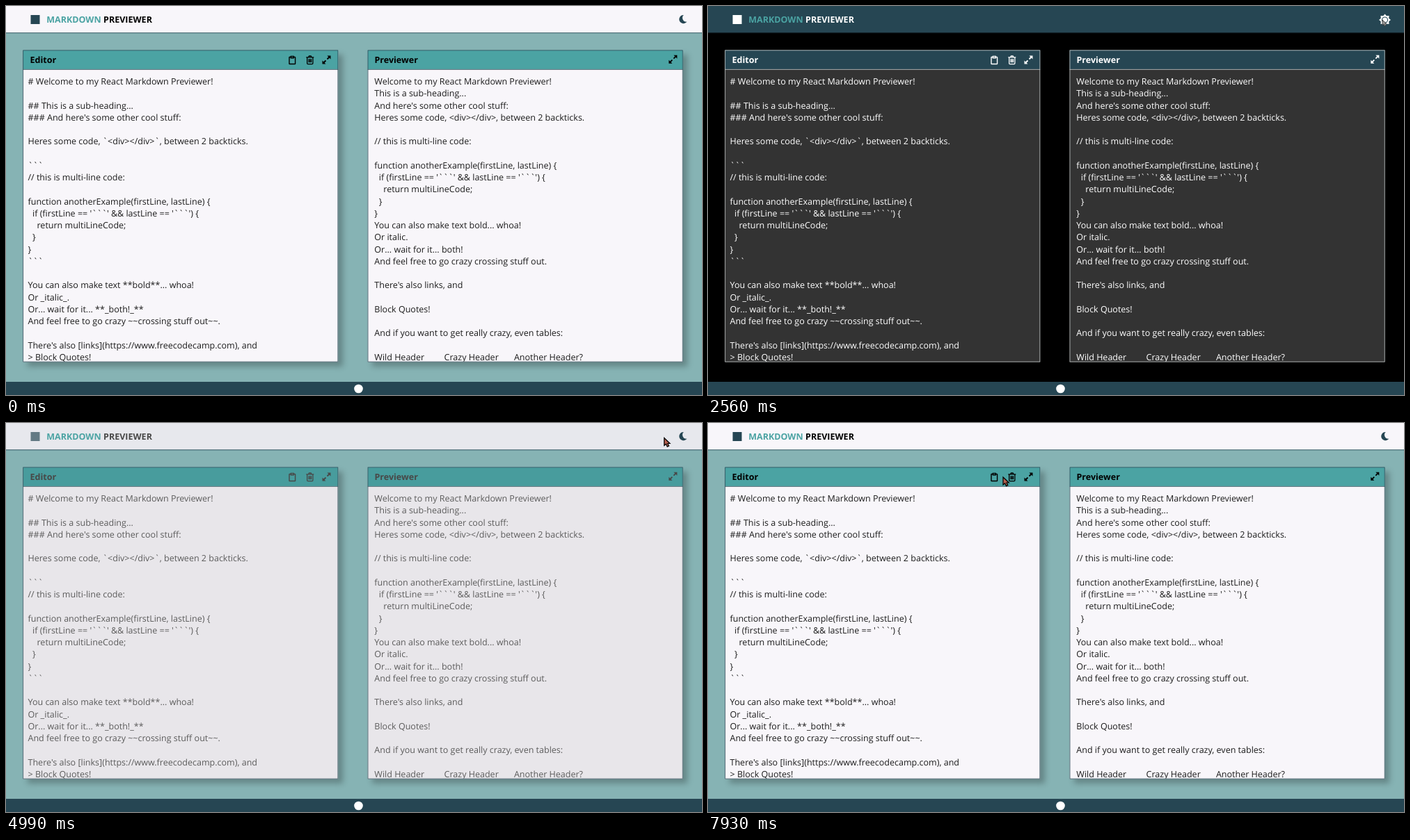
Recreate the animation shown at these times as an HTML page with a canvas. Size 1000 by 560 pixels, loop 8000 ms.

```html
<!DOCTYPE html>
<html lang="en">
<head>
<meta charset="utf-8">
<title>Markdown Previewer</title>
<style>
  html, body { margin: 0; width: 100%; height: 100%; overflow: hidden; }
  canvas { display: block; }
</style>
</head>
<body>
<canvas id="stage" width="1000" height="560"></canvas>
<script>
const ctx = document.getElementById('stage').getContext('2d');
const LOOP = 8000;
const PX = 1000 / 1276; // one page pixel; the page is 1276 wide
const LINE = 22 * PX;
const FONT = `${16 * PX}px "Open Sans", sans-serif`;
ctx.textRendering = 'geometricPrecision';

const editorText = `# Welcome to my React Markdown Previewer!

## This is a sub-heading...
### And here's some other cool stuff:

Heres some code, \`<div></div>\`, between 2 backticks.

\`\`\`
// this is multi-line code:

function anotherExample(firstLine, lastLine) {
  if (firstLine == '\`\`\`' && lastLine == '\`\`\`') {
    return multiLineCode;
  }
}
\`\`\`

You can also make text **bold**... whoa!
Or _italic_.
Or... wait for it... **_both!_**
And feel free to go crazy ~~crossing stuff out~~.

There's also [links](https://www.freecodecamp.com), and
> Block Quotes!`.split('\n');

const previewText = `Welcome to my React Markdown Previewer!
This is a sub-heading...
And here's some other cool stuff:
Heres some code, <div></div>, between 2 backticks.

// this is multi-line code:

function anotherExample(firstLine, lastLine) {
  if (firstLine == '\`\`\`' && lastLine == '\`\`\`') {
    return multiLineCode;
  }
}
You can also make text bold... whoa!
Or italic.
Or... wait for it... both!
And feel free to go crazy crossing stuff out.

There's also links, and

Block Quotes!

And if you want to get really crazy, even tables:
`.split('\n');

const LIGHT_AGAIN = 4810;

// [time, darkness]
const themeSteps = [[0, 0], [2330, 0.07], [2410, 0.6], [2490, 0.9], [2560, 1],
  [LIGHT_AGAIN, 0.88], [4890, 0.35], [4970, 0.08], [5040, 0]];

// [start, end, steps, fromX, fromY, toX, toY]
const moves = [
  [430, 515, 2, 976, 809, 985, 271],
  [750, 1380, 9, 994, 44, 969, 20],
  [4960, 5500, 8, 969, 20, 426, 55],
  [5670, 6050, 6, 426, 55, 405, 73],
  [6670, 6760, 2, 405, 73, 405, 75],
  [7780, 7930, 3, 405, 75, 424, 78]
];

const shapes = {
  clipboard: new Path2D('M3 2H1.2Q.7 2 .7 2.6V11.4Q.7 12 1.2 12H8.8Q9.3 12 9.3 11.4V2.6Q9.3 2 8.8 2H7M3 1H7V3.2H3Z'),
  trash: new Path2D('M0 2.5H11M3.3 2.3L4.2.7H6.8L7.7 2.3M1.4 2.7V11.3Q1.4 12.3 2.4 12.3H8.6Q9.6 12.3 9.6 11.3V2.7M3.8 5V10M5.5 5V10M7.2 5V10'),
  expandLine: new Path2D('M2 10L5 7M7 5L10 2'),
  expandHeads: new Path2D('M7 0H12V5ZM0 7V12H5Z'),
  moon: new Path2D('M973.7 13A6.1 6.1 0 1 0 978.3 22.6A5.6 5.6 0 0 1 973.7 13Z'),
  arrow: new Path2D('M0 0V11L2.6 8.8L4.5 12.6L6.8 11.5L5 8H8.3Z')
};

const lerp = (a, b, p) => a + (b - a) * p;
const smooth = p => p * p * (3 - 2 * p);
const mix = (a, b, p) => `rgb(${a.map((v, i) => Math.round(lerp(v, b[i], p)))})`;
const lastStarted = (list, t) => list.filter(item => item[0] <= t).pop();

const BLACK = [0, 0, 0], WHITE = [255, 255, 255], INK = [28, 28, 28];
const PAPER = [248, 246, 250], SLATE = [51, 51, 51];
const NAVY = [38, 70, 83], TEAL = [75, 163, 163], SAGE = [134, 179, 180];

function rect(x, y, w, h, color) {
  ctx.fillStyle = color;
  ctx.fillRect(x, y, w, h);
}

function text(str, x, y, color, bold) {
  ctx.font = (bold ? 'bold ' : '') + FONT;
  ctx.fillStyle = color;
  ctx.fillText(str, x, y);
}

function at(x, y, draw) {
  ctx.save();
  ctx.translate(x, y);
  draw();
  ctx.restore();
}

function outline(shape, x, y, color, width) {
  at(x, y, () => {
    ctx.strokeStyle = color;
    ctx.lineWidth = width;
    ctx.stroke(shape);
  });
}

function expandIcon(x, y, color) {
  outline(shapes.expandLine, x, y, color, 1.8);
  at(x, y, () => {
    ctx.fillStyle = color;
    ctx.fill(shapes.expandHeads);
  });
}

function disc(x, y, r, color) {
  ctx.fillStyle = color;
  ctx.beginPath();
  ctx.arc(x, y, r, 0, 7);
  ctx.fill();
}

function sun(x, y, back) {
  ctx.fillStyle = '#fff';
  ctx.beginPath();
  for (let i = 0; i < 16; i++) {
    const r = i % 2 ? 6.2 : 8.5, a = i * Math.PI / 8;
    ctx.lineTo(x + r * Math.cos(a), y + r * Math.sin(a));
  }
  ctx.fill();
  disc(x, y, 4.6, back);
  disc(x, y, 3.5, '#fff');
}

function panel(pageX, title, titleX, lines, textX, theme) {
  const x = pageX * PX, y = 81 * PX, w = 578 * PX, h = 573 * PX, bar = 35 * PX;

  ctx.save();
  ctx.shadowColor = 'rgba(0,0,0,.25)';
  ctx.shadowBlur = 8;
  ctx.shadowOffsetX = ctx.shadowOffsetY = 8 * PX;
  rect(x, y, w, h, theme.paper);
  ctx.restore();
  rect(x, y, w, bar, theme.bar);
  text(title, titleX, 82, theme.heading, true);

  ctx.save();
  ctx.beginPath();
  ctx.rect(x, y, w, h - PX);
  ctx.clip();
  lines.forEach((line, i) => {
    const cells = Array.isArray(line) ? line : [line];
    cells.forEach((cell, col) => text(cell, textX + col * 100.3, 113.2 + i * LINE, theme.ink));
  });
  ctx.restore();

  ctx.strokeStyle = theme.border;
  ctx.lineWidth = PX;
  ctx.strokeRect(x + PX / 2, y + PX / 2, w - PX, h - PX);
  rect(x, y + bar, w, PX, theme.border);
}

function cursor(t) {
  const move = lastStarted(moves, t);
  if (!move || (t >= 600 && t < 750)) return;
  const [start, end, steps, x0, y0, x1, y1] = move;
  const step = Math.min(steps - 1, Math.floor((t - start) / (end - start) * (steps - 1) + 0.01));
  const p = smooth((step + 1) / steps);
  const resting = t >= 2560 && t < 4410;
  at(lerp(x0, x1, p), lerp(y0, y1, p), () => {
    if (resting) ctx.scale(0.7, 0.7);
    ctx.fillStyle = resting ? '#999' : t < 4960 ? '#000' : '#b5604f';
    ctx.fill(shapes.arrow);
    ctx.strokeStyle = resting ? '#333' : '#000';
    ctx.lineWidth = 1.2;
    ctx.stroke(shapes.arrow);
  });
}

function draw(t) {
  const dark = lastStarted(themeSteps, t)[1];
  const inkFade = Math.sqrt(dark);
  const theme = {
    paper: mix(PAPER, SLATE, dark),
    bar: mix(TEAL, NAVY, dark),
    ink: mix(INK, WHITE, inkFade),
    heading: mix(BLACK, WHITE, inkFade),
    border: mix(NAVY, [200, 205, 205], dark)
  };
  const header = mix(PAPER, NAVY, dark);
  const navy = mix(NAVY, NAVY, 0);

  // The backdrop fades to black but snaps straight back to light.
  rect(0, 0, 1000, 560, mix(SAGE, BLACK, t < LIGHT_AGAIN ? dark : 0));
  rect(0, 0, 1000, 49 * PX, header);
  rect(0, 49 * PX, 1000, PX, mix(NAVY, [20, 36, 43], dark));
  rect(0, 541, 1000, 19, navy);
  disc(506.5, 551, 6.3, '#fff');

  rect(35.5, 13, 13, 13, mix(NAVY, WHITE, inkFade));
  text('MARKDOWN', 58.2, 24.3, mix(TEAL, TEAL, 0), true);
  text('PREVIEWER', 140.1, 24.3, theme.heading, true);

  panel(31, 'Editor', 34.5, editorText, 31.5, theme);
  panel(663, 'Previewer', 529.5, [...previewText, ['Wild Header', 'Crazy Header', 'Another Header?']], 529.3, theme);
  outline(shapes.clipboard, 406.3, 71.5, theme.heading, 1.4);
  outline(shapes.trash, 431.3, 71.3, theme.heading, 1.3);
  expandIcon(454.5, 71.5, theme.heading);
  expandIcon(952.3, 70.7, theme.heading);

  if (t >= 2330 && t < 4890) {
    sun(972.5, 20, header);
  } else {
    ctx.fillStyle = navy;
    ctx.fill(shapes.moon);
  }
  cursor(t);
}

function frame(now) {
  draw(now % LOOP);
  requestAnimationFrame(frame);
}
requestAnimationFrame(frame);
</script>
</body>
</html>
```
